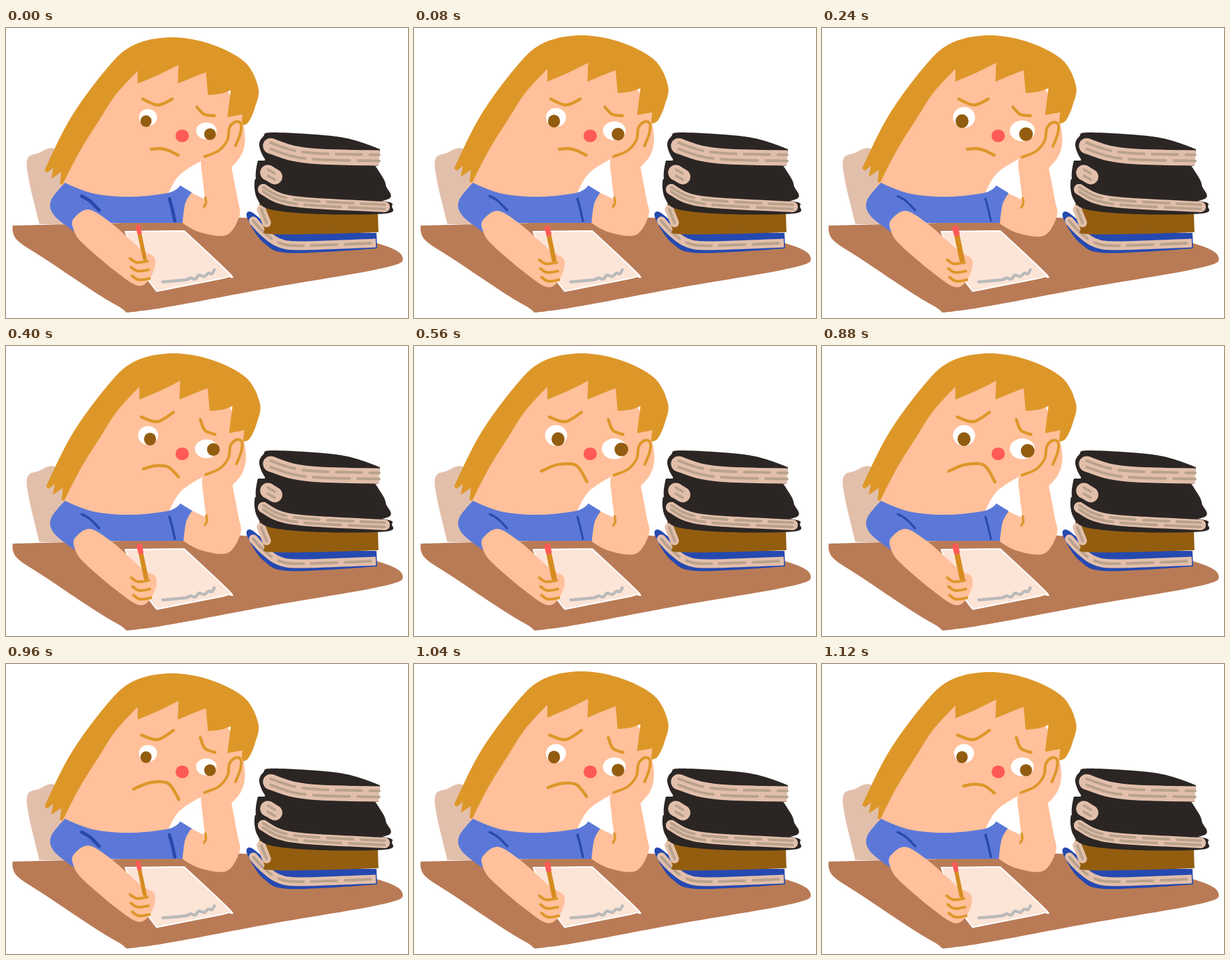
An HTML page that plays this animation: 600x433 px, repeating every 1200 ms.

```html
<!DOCTYPE html>
<html lang="en">
<head>
<meta charset="utf-8">
<title>Homework</title>
<style>
html, body { margin: 0; width: 100%; height: 100%; overflow: hidden; background: #fff; }
svg { display: block; width: 600px; height: 433px; }
</style>
</head>
<body>
<svg viewBox="0 0 600 433" fill="none" stroke-linecap="round" stroke-linejoin="round">
  <g id="scene"></g>
  <g id="girl"></g>
</svg>
<script>
const SKIN = '#ffc09b', HAIR = '#dd9729', SHIRT = '#5b78d8', CREASE = '#2749ad',
      WOOD = '#b97b56', PAGE = '#e2bfab', GRAIN = '#b9a28c', BLACK = '#2b2624',
      BROWN = '#935d10', BLUE = '#2549b0', RED = '#ff5a57';
const STEP = 80, COUNT = 15;

// "x,y x,y! ..." -> points; "!" marks a sharp corner
const parse = s => s.split(' ').map(t => {
  const [x, y] = t.replace('!', '').split(',').map(Number);
  return { x, y, sharp: t.endsWith('!') };
});

// Smooth curve through the points
function curve(pts, closed) {
  const n = pts.length;
  const at = i => closed ? pts[(i + n) % n] : pts[Math.max(0, Math.min(n - 1, i))];
  const handle = (i, dir) => {
    const p = at(i), k = p.sharp ? 0 : dir / 6;
    return `${p.x + (at(i + 1).x - at(i - 1).x) * k},${p.y + (at(i + 1).y - at(i - 1).y) * k}`;
  };
  let d = `M${pts[0].x},${pts[0].y}`;
  for (let i = 0; i < (closed ? n : n - 1); i++) {
    const q = at(i + 1);
    d += `C${handle(i, 1)} ${handle(i + 1, -1)} ${q.x},${q.y}`;
  }
  return d + (closed ? 'Z' : '');
}

const shape = (s, fill, extra = '') => `<path d="${curve(parse(s), true)}" fill="${fill}" ${extra}/>`;
const stroke = (pts, color, w, extra = '') =>
  `<path d="${curve(pts, false)}" stroke="${color}" stroke-width="${w}" ${extra}/>`;
const line = (s, color, w, extra) => stroke(parse(s), color, w, extra);
const oval = (x, y, rx, ry, fill) => `<ellipse cx="${x}" cy="${y}" rx="${rx}" ry="${ry}" fill="${fill}"/>`;
const move = ([x, y], body) => `<g transform="translate(${x} ${y})">${body}</g>`;
const mix = (a, b, k) => a.map((p, i) => ({ x: p.x + (b[i].x - p.x) * k, y: p.y + (b[i].y - p.y) * k }));
const ramp = (t, from, to) => {
  const k = Math.max(0, Math.min(1, (t - from) / (to - from)));
  return k * k * (3 - 2 * k);
};

// A cover with a thick band of pages along the spine curve, grained with dashes
function book(color, cover, spine, width, cap = 'round') {
  const start = parse(spine)[0];
  const offsets = width > 15 ? [-width / 5, width / 5] : [0];
  return shape(cover, color) +
    line(spine, PAGE, width, `stroke-linecap="${cap}"`) +
    oval(start.x, start.y, width / 2, width / 2, PAGE) +
    offsets.map((dy, i) => move([0, dy], line(spine, GRAIN, 4, `stroke-dasharray="${38 + 16 * i} 12"`))).join('');
}

function drawScene() {
  return shape('50,293! 31,205 48,187 80,188 110,293!', PAGE) +
    shape('10,295! 178,291! 350,283! 400,286! 553,321 592,343 560,359 400,387 205,422 165,414 60,346 16,316', WOOD) +
    book(BLUE, '360,284 367,275 400,304! 553,306! 554,329! 425,336 385,321', '369,288 384,304 406,320 440,325 552,321', 13, 'butt') +
    book(BROWN, '378,262! 555,275! 556,305! 402,308 385,298', '381,271 389,291', 13) +
    book(BLACK, '376,198! 545,198! 556,213 567,235 560,258 400,256 374,229', '391,216 401,222', 23) +
    book(BLACK, '371,230 380,227 430,250 560,258 576,267 566,277 470,278 395,271 375,255', '384,241 408,254 450,261 565,267', 16) +
    book(BLACK, '378,175 384,162 400,156 500,163 558,181! 555,206! 400,205 386,195', '395,176 428,187 470,192 557,194', 23, 'butt') +
    shape('178,304! 266,303! 333,366 332,371 322,374! 225,393! 200,357', '#fce4d7', 'stroke="#fff" stroke-width="2"') +
    line('234,379 268,376 275,373 282,375 288,369 296,371 302,366 307,367 311,361', '#bababa', 4.5);
}

// The redrawn poses differ by small shifts and by the weight of the pen
const POSES = [
  { head: [-2.5, 3], eye: .9, pupil: .92, arm: [-2, -2], prop: [-.5, 0], crease: 5, pencil: 6 },
  { head: [0, 0], eye: 1, pupil: 1, arm: [0, 0], prop: [1, 0], crease: 3.5, pencil: 7 },
  { head: [0, 1], eye: 1, pupil: .95, arm: [-1, 0], prop: [0, 0], crease: 3.5, pencil: 6 },
  { head: [0, 0], eye: 1.1, pupil: 1.08, arm: [0, 0], prop: [1.5, 1], crease: 3, pencil: 8 }
];

const MOUTH = ['217,181 230,180 243,183 257,190', '189,187 214,177 242,178 258,203'].map(parse);
const BROWS = [
  ['204,106 227,115 248,106', '202,106 226,113 250,99'],
  ['285,118 296,129 311,131', '290,110 297,126 312,132']
].map(pair => pair.map(parse));

function drawFeatures({ eye, pupil }, step) {
  const rise = ramp(step, 3, 5);
  const look = rise * (1 - ramp(step, 10, 12));
  const frown = ramp(step, 3, 7.5) * (1 - ramp(step, 11.5, 15));
  return oval(212, 133.5, 15 * eye, 14 * eye, '#fff') +
    oval(299, 153.5, 17 * eye, 14 * eye, '#fff') +
    oval(209 + 6 * look, 139, 9 * pupil, 9.5 * pupil, BROWN) +
    oval(304.5 + 5 * look, 158.5 - 4 * look, 9.5 * pupil, 9.5 * pupil, BROWN) +
    oval(263, 161, 10, 9.5, RED) +
    BROWS.map(([low, high]) => stroke(mix(low, high, rise), HAIR, 4.5)).join('') +
    stroke(mix(...MOUTH, frown), HAIR, 4.5);
}

const drawHead = () =>
  shape('195,45! 300,40! 354,123! 353,150 335,176 300,192 261,217 242,250! 190,258 130,250 85,233! 92,205 120,145 150,95', SKIN) +
  shape('60,210! 98,133 150,61 190,24 245,11 305,20 358,47 379,86 374,116 364,138 354,143! 355,126! 333,130! 338,90! 323,95 304,97! 301,63! 283,70 259,80! 260,52! 232,66 199,80! 199,61! 166,97 142,134 112,182 87,231! 83,230! 85,212! 70,222! 73,206! 64,213!', HAIR);

const drawShirt = width =>
  shape('88,231! 130,247 185,252 243,246 260,235! 278,246! 285,291! 150,291! 102,304! 72,280 67,258', SHIRT) +
  line('113,251 125,258 139,272', CREASE, width) +
  line('244,255 248,270 252,288', CREASE, width);

const drawPropArm = () =>
  shape('277,246! 298,256! 294,225 293,194 315,184 330,168 334,150 343,140 354,143 357,170 351,191 337,208! 346,255 349,280 330,309 290,305 264,291! 268,262', SKIN) +
  line('298,253 299,261 296,267', HAIR, 3.5) +
  line('297,192 318,183 331,167 334,149 343,140 351,143 350,158 343,176', HAIR, 4);

function drawWritingArm(width) {
  const fingers = [0, 13, 26].map(dy => move([dy / 8, dy], line('187,346 197,352 213,350', HAIR, 4)));
  return shape('103,303! 102,288 125,273 160,294 203,332 224,346 219,372 200,387 165,365 115,322', SKIN) +
    line('201,308 209,346', '#d58c20', width) +
    line('199,299 201,307', RED, width + 1) +
    fingers.join('');
}

function drawGirl(step) {
  const p = POSES[step % POSES.length];
  return move(p.head, drawHead()) + drawShirt(p.crease) + drawFeatures(p, step) +
    move(p.prop, drawPropArm()) + move(p.arm, drawWritingArm(p.pencil));
}

const girl = document.getElementById('girl');
document.getElementById('scene').innerHTML = drawScene();
const start = performance.now();
let shown = -1;

function tick(now) {
  const step = Math.floor(Math.max(0, now - start) / STEP) % COUNT;
  if (step !== shown) girl.innerHTML = drawGirl(shown = step);
  requestAnimationFrame(tick);
}
tick(start);
</script>
</body>
</html>
```
